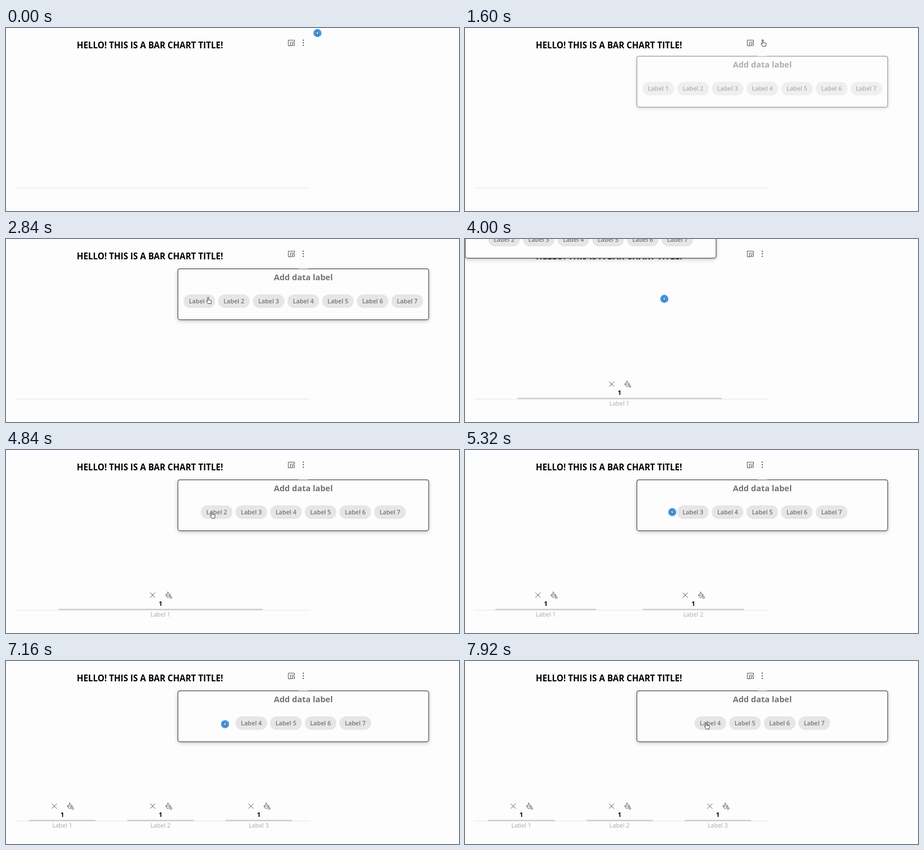
These frames come from a looping animation (800 by 324 pixels, 8000 ms). An HTML page:

```html
<!DOCTYPE html>
<html lang="en">
<head>
<meta charset="utf-8">
<title>Bar chart labels</title>
<style>
  html, body { margin: 0; width: 100%; height: 100%; overflow: hidden; background: #fefdfe; }
  svg { display: block; width: 800px; height: 324px; }
  text { font-family: "Open Sans", "Noto Sans", sans-serif; text-anchor: middle; }
  .title { font-size: 15.1px; font-weight: 700; }
  .value { font-size: 11px; font-weight: 700; }
  .axis { font-size: 10.6px; fill: #a9a8aa; }
  .heading { font-size: 14.5px; font-weight: 700; fill: #757476; }
  .pill { font-size: 10.7px; font-weight: 600; fill: #757476; }
  .line { fill: none; stroke: #5c5b5d; stroke-width: 1; }
  .panel { fill: #fefdfe; stroke: #6a696b; stroke-width: 1.5; filter: drop-shadow(0 2px 3px rgba(0,0,0,.2)); }
  .notch { fill: #fefdfe; filter: drop-shadow(0 0 1px rgba(0,0,0,.08)); }
</style>
</head>
<body>
<svg viewBox="0 0 800 324">
  <defs>
    <g id="tools" class="line">
      <path d="M-18.5 252.5l9 9m0-9l-9 9"/>
      <path d="M13 250.5v4M9 257l4.5-4.5 4.5 4.5-4 4h-2zh9"/>
      <circle cx="18.3" cy="261" r="1.7"/>
    </g>
    <g id="arrow">
      <circle r="7.2" fill="#4196e8"/>
      <path d="M-1.8-3.6v6.4l1.5-1.4 1 2.1 1.1-.5-1-2h2z" fill="#fff" stroke="#333" stroke-width=".7"/>
    </g>
    <path id="hand" d="M-1 7V1a1 1 0 0 1 2 0v4l4 .8q1 .3 .8 1.5L5 11.5H0L-3 7.5q0-1.4 1-1z"
      fill="#fff" stroke="#444" stroke-width="1"/>
  </defs>
  <path d="M16 283.5H537" stroke="#e5e4e6"/>
  <g id="bars"></g>
  <text class="title" x="254.2" y="35.5">HELLO! THIS IS A BAR CHART TITLE!</text>
  <g class="line">
    <path d="M505 31.5h-6.500v-10h11v4M502.500 31.500v-6.500h7"/>
    <path d="M505.500 27.500h4v3.500h-4z"/>
  </g>
  <g fill="#555"><circle cx="525" cy="21.7" r="1.1"/><circle cx="525" cy="26.200" r="1.1"/><circle cx="525" cy="30.700" r="1.1"/></g>
  <g id="popup">
    <rect class="panel" x="303.5" y="52.700" width="443" height="90.300" rx="4"/>
    <path class="notch" d="M516 52.500l9-8 9 8z"/>
    <text class="heading" x="525" y="73">Add data label</text>
    <g id="pills"></g>
  </g>
  <use id="cursor"/>
</svg>
<script>
const LOOP = 8000, OPEN = 1580, LABELS = 7;
const CLICKS = [3480, 5160, 6280];
const JUMP = 200, RETURN = 600;   // popup loses its anchor for a moment after each click
const PILL = 56, STEP = 61.2;
const PATH = [
  [0, 550, 9], [40, 550, 9], [820, 530, 20], [1080, 526, 21], [1640, 526, 21],
  [2400, 455, 80], [2840, 357, 103], [3480, 357, 103], [3900, 352, 106],
  [4400, 352, 106], [5000, 366, 110], [5400, 366, 110], [5900, 385, 112],
  [7120, 385, 112], [7440, 426, 109], [LOOP, 426, 109]
];
const [bars, popup, pills, cursor] =
  ["bars", "popup", "pills", "cursor"].map(id => document.getElementById(id));
const repeat = (n, draw) => Array.from({ length: n }, (_, i) => draw(i)).join("");
let shown = -1;

function cursorAt(t) {
  const i = PATH.findIndex(p => p[0] > t);
  const [t0, x0, y0] = PATH[i - 1], [t1, x1, y1] = PATH[i];
  const u = (t - t0) / (t1 - t0), k = u * u * (3 - 2 * u);
  return [x0 + (x1 - x0) * k, y0 + (y1 - y0) * k];
}

const pillStart = n => 525 - (PILL + STEP * (n - 1)) / 2;

function drawLabels(count) {
  const slot = 520.6 / count, width = slot * 0.7 - 4;
  bars.innerHTML = repeat(count, i => {
    const x = 12.6 + slot * (i + 0.5);
    return `<rect x="${x - width / 2}" y="281.2" width="${width}" height="2.3" fill="#cfcdcf"/>
      <use href="#tools" x="${x}"/>
      <text class="value" x="${x}" y="276">1</text>
      <text class="axis" x="${x}" y="295">Label ${i + 1}</text>`;
  });
  const left = LABELS - count;
  pills.innerHTML = repeat(left, i => {
    const x = pillStart(left) + STEP * i;
    return `<rect x="${x}" y="98" width="${PILL}" height="24" rx="12" fill="#e7e5e7"/>
      <text class="pill" x="${x + PILL / 2}" y="114">Label ${count + i + 1}</text>`;
  });
}

function render(t) {
  const count = CLICKS.filter(c => t >= c).length;
  if (count !== shown) drawLabels(shown = count);

  const sinceClick = count ? t - CLICKS[count - 1] : Infinity;
  const jumped = sinceClick >= JUMP && sinceClick < RETURN;
  const age = sinceClick < RETURN ? Infinity : Math.min(t - OPEN, count ? sinceClick - RETURN : Infinity);
  const fade = t < OPEN ? 0 : Math.min(1, 0.5 + age / 300);
  popup.setAttribute("opacity", fade);
  popup.setAttribute("transform", jumped ? "translate(-303 -109)" : `translate(0 ${-6.5 * (1 - fade)})`);

  const [x, y] = cursorAt(t);
  const left = LABELS - count, offset = x - pillStart(left);
  const onPill = fade && !jumped && y > 98 && y < 122 &&
    offset >= 0 && offset < STEP * left && offset % STEP < PILL;
  const onMenu = Math.hypot(x - 525, y - 26) < 11;
  cursor.setAttribute("href", onPill || onMenu ? "#hand" : "#arrow");
  cursor.setAttribute("transform", `translate(${x} ${y})`);
}

function tick() {
  render(performance.now() % LOOP);
  requestAnimationFrame(tick);
}
tick();
</script>
</body>
</html>
```
